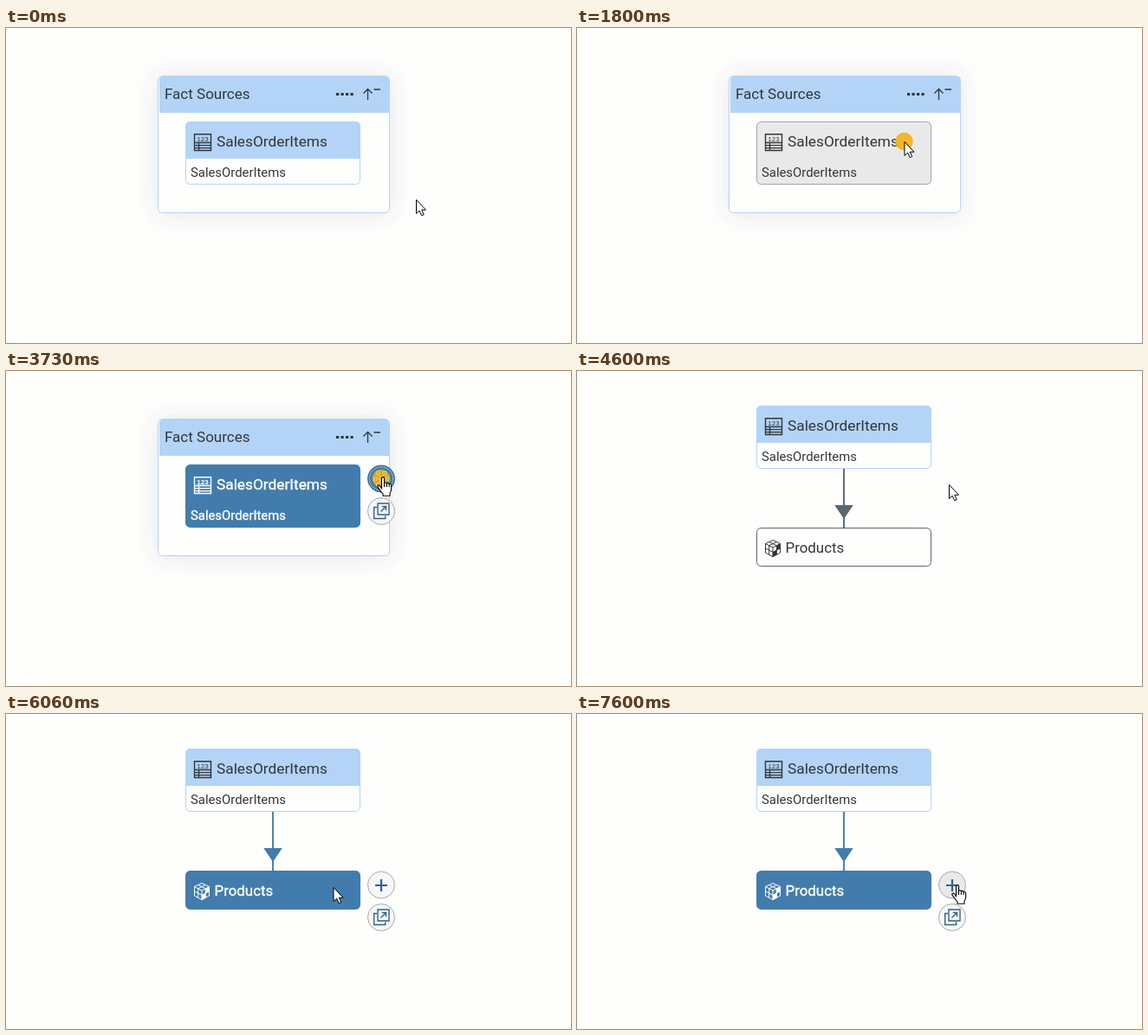
Animation, 652 px wide and 364 px high, one loop 8 s. Source, as an HTML page:

```html
<!DOCTYPE html>
<html lang="en">
<head>
<meta charset="utf-8">
<title>Fact sources</title>
<style>
html, body { margin: 0; width: 100%; height: 100%; overflow: hidden; background: #fefefd; }
svg { display: block; width: 652px; height: 364px; }
text { font-family: Roboto, "Open Sans", sans-serif; fill: #32363a; }
.on text { fill: #fff; stroke: #fff; stroke-width: .35px; }
.ink { color: #32363a; }
.on .ink { color: #fff; }
.line { fill: none; stroke: currentColor; }
.mini { font: 7.5px "Liberation Mono", monospace; }
.btn { color: #346187; }
</style>
</head>
<body>
<svg viewBox="0 0 652 364">
  <defs>
    <filter id="soft" x="-30%" y="-40%" width="160%" height="180%">
      <feDropShadow dx="0" dy="1" stdDeviation="13" flood-color="#50506e" flood-opacity=".15"/>
    </filter>
    <g id="open">
      <path class="line" stroke-width="1.4" d="M-4-9H9V4H-4ZM-5-4.5H-8.3V8.5H4.7V5.2M-.5.5 5.3-5.3M.8-5.5H5.5V-.8"/>
    </g>
    <g id="cells"></g>
    <path id="arrow" d="M.5.5V16.5L4.2 13.2 6.7 18.7 9.2 17.6 6.8 12.2H11.5Z" fill="#fff" stroke="#000"/>
    <path id="hand" transform="translate(-5 -2)" fill="#fff" stroke="#000" stroke-width="1.1" stroke-linejoin="round"
      d="M5.5 14V2.2Q5.5.6 7 .6T8.5 2.2V8Q8.6 6.7 10 6.8T11.4 8.3Q11.5 7.3 12.8 7.4T14.1 9Q14.3 8.3 15.4 8.5T16.6 10.2V14.5Q16.6 17 15 19.3V22.3H7V19.8Q5 18 3.7 15.8L1 12.2Q.3 10.9 1.4 10.3T3.6 11ZM8.5 8V12M11.4 8.3V12M14.1 9V12"/>
  </defs>
  <rect width="652" height="364" fill="#fefefd"/>

  <g id="panel">
    <rect x="175.5" y="55.5" width="267" height="158" rx="5" fill="#fefefd" stroke="#b3d4f6" filter="url(#soft)"/>
    <path d="M177 98V60Q177 56 181 56H438Q442 56 442 60V98Z" fill="#b3d4f6"/>
    <text x="183" y="82" font-size="17">Fact Sources</text>
    <path d="M381 76.5h20" stroke="#32363a" stroke-width="3" stroke-dasharray="3.2 2.3"/>
    <path class="line ink" stroke-width="1.3" d="M417.5 83V70.5M412.5 75.5 417.5 70.5 422.5 75.5M424.5 71H432"/>
  </g>

  <g id="link">
    <path d="M308 113V181" stroke="currentColor" stroke-width="1.9"/>
    <path d="M297.3 155H318.7L308 171Z" fill="currentColor"/>
  </g>

  <g id="sales">
    <rect id="salesBox" x="207.5" y="108.5" width="201" height="72" rx="5"/>
    <path id="salesHead" d="M207 151V114Q207 108 213 108H403Q409 108 409 114V151Z" fill="#b3d4f6"/>
    <g class="ink">
      <path class="line" stroke-width="1.4" d="M217.5 122.8H236.5V132.5H217.5ZM217.5 132.5V141.5H236.5V132.5M217.5 135.6H236.5M217.5 138.6H236.5M222.5 132.5V141.5"/>
    </g>
    <text class="mini" x="220.3" y="130.6">123</text>
    <text x="243" y="137" font-size="17.3">SalesOrderItems</text>
    <text x="213" y="172" font-size="14.85">SalesOrderItems</text>
  </g>

  <g id="prod">
    <rect id="prodBox" x="207.5" y="181.5" width="201" height="44" rx="5"/>
    <g class="ink">
      <path class="line" stroke-width="1" d="M226 195.5 234.5 199.5V210L226 214.7 217.5 210V199.5ZM217.5 199.5 226 204 234.5 199.5M226 204V214.7M221.7 197.5 230.3 201.7V212.3M230.3 197.5 221.7 201.7V212.3M217.5 204.8 226 209.4 234.5 204.8"/>
      <path fill="currentColor" d="M230.3 201.7 234.5 199.5V204.8L230.3 207ZM226 209.4 230.3 207V212.3L226 214.7Z"/>
    </g>
    <text x="240.5" y="210" font-size="16.9">Products</text>
  </g>

  <g id="btnA" class="btn">
    <circle id="ringA" r="15.5"/>
    <circle id="dash" r="13.7" fill="none" stroke="#fff" stroke-dasharray="1.2 1.2"/>
    <circle id="tint" r="10" fill="#f3d590" opacity=".5"/>
    <use id="net" href="#cells"/>
    <path id="plus" d="M-7 .5H7M0-6.5V7.5" stroke="currentColor" stroke-width="2.2"/>
  </g>
  <g id="btnB" class="btn">
    <circle r="15.5" fill="#f7f7f7" stroke="#a9a9ab"/>
    <use href="#open"/>
  </g>

  <circle id="dot" r="10.3" fill="#f2b51d"/>
  <use id="cursor"/>
</svg>
<script>
const LOOP = 8000, STEP = 800 / 12;
const el = {};
document.querySelectorAll('[id]').forEach(n => el[n.id] = n);

// network icon: three rows of linked squares
const cells = [[-3.5, -6.5], [3.8, -6.5], [-7, 0], [0, 0], [7, 0], [-3.5, 6.5], [3.8, 6.5]];
el.cells.innerHTML = '<path class="line" stroke-width="1.2" d="' +
  cells.map(([x, y]) => `M${x - 1.7} ${y - 1.7}h3.4v3.4h-3.4Z`).join('') +
  'M-5.2 0H-1.8M1.8 0H5.2M-2.5-4.7-1-1.8M2.7-4.7 1-1.8M-2.5 4.7-1 1.8M2.7 4.7 1 1.8"/>';

// pointer trips: start time, steps, from, bend, to
const trips = [
  { at: 600, n: 13, a: [473, 198], c: [422, 160], b: [377.5, 131] },
  { at: 2400, n: 13, a: [377.5, 131], c: [423, 118], b: [433, 124] },
  { at: 4600, n: 13, a: [433, 124], c: [407, 170], b: [377.5, 200] },
  { at: 7200, n: 7, a: [377.5, 200], c: [408, 197], b: [437, 199] }
];
const clicks = [{ at: 1460, end: 2000 }, { at: 3260, end: 3930 }, { at: 5460, end: 6060 }];
const PICK_SALES = 1860, PRESS = 3460, SWITCH = 3860, PICK_PROD = 5860;

const clamp = v => Math.max(0, Math.min(1, v));
const show = (node, on) => node.style.display = on ? '' : 'none';
const move = (node, x, y) => node.setAttribute('transform', `translate(${x} ${y})`);
const paint = (node, fill, stroke) => {
  node.setAttribute('fill', fill);
  node.setAttribute('stroke', stroke);
};

function pointer(t) {
  let pos = trips[0].a;
  for (const { at, n, a, b, c } of trips) {
    if (t < at) break;
    const p = Math.min(1, (Math.floor((t - at) / STEP + .06) + 1) / n), q = 1 - p;
    pos = a.map((v, i) => q * q * v + 2 * p * q * c[i] + p * p * b[i]);
  }
  return pos;
}

function dotAlpha(t) {
  const k = clicks.find(c => t >= c.at && t < c.end);
  return k ? Math.min(clamp((t - k.at + 70) / 210), clamp((k.end - t) / 130)) : 0;
}

function card(group, box, picked, hover, near, border) {
  group.classList.toggle('on', picked);
  const blue = near ? '#427cac' : '#4389c8';
  if (picked) paint(box, blue, blue);
  else if (hover) paint(box, '#eae9ea', '#a3a3a5');
  else paint(box, '#fefefd', border);
}

function draw(t) {
  const [x, y] = pointer(t);
  const second = t >= SWITCH;
  const salesOn = t >= PICK_SALES && !second, prodOn = t >= PICK_PROD;
  const top = second ? 181 : 108, bottom = second ? 226 : 181;
  const inCard = x < 409 && x > 207 && y > top && y < bottom;
  const by = second ? 197.5 : 124.5;
  const open = salesOn || prodOn;
  const onBtn = open && Math.hypot(x - 433, y - by) < 16;
  const pressed = t >= PRESS && !second;

  show(el.panel, !second);
  show(el.link, second);
  show(el.prod, second);
  el.link.style.color = prodOn ? '#427cac' : '#5b6670';

  move(el.sales, 0, second ? -68 : 0);
  card(el.sales, el.salesBox, salesOn, !second && inCard, inCard || onBtn, '#b3d4f6');
  show(el.salesHead, !salesOn && (second || !inCard));
  card(el.prod, el.prodBox, prodOn, inCard, inCard || onBtn, '#5b6670');

  show(el.btnA, open);
  show(el.btnB, open);
  move(el.btnA, 433, by);
  move(el.btnB, 433, by + 37.5);
  if (pressed) paint(el.ringA, '#427cac', '#346187');
  else paint(el.ringA, onBtn ? '#e9e9ea' : '#f7f7f7', '#a9a9ab');
  el.btnA.style.color = pressed ? '#fff' : '';
  show(el.dash, pressed);
  show(el.tint, salesOn && t < clicks[1].at);
  show(el.net, !second);
  show(el.plus, second);

  move(el.dot, x, y);
  el.dot.setAttribute('opacity', dotAlpha(t) * (pressed ? .82 : .97));
  const hand = onBtn || (second && t < trips[2].at);
  el.cursor.setAttribute('href', hand ? '#hand' : '#arrow');
  move(el.cursor, x, y);
}

function tick(now) {
  draw(now % LOOP);
  requestAnimationFrame(tick);
}
draw(0);
requestAnimationFrame(tick);
</script>
</body>
</html>
```
